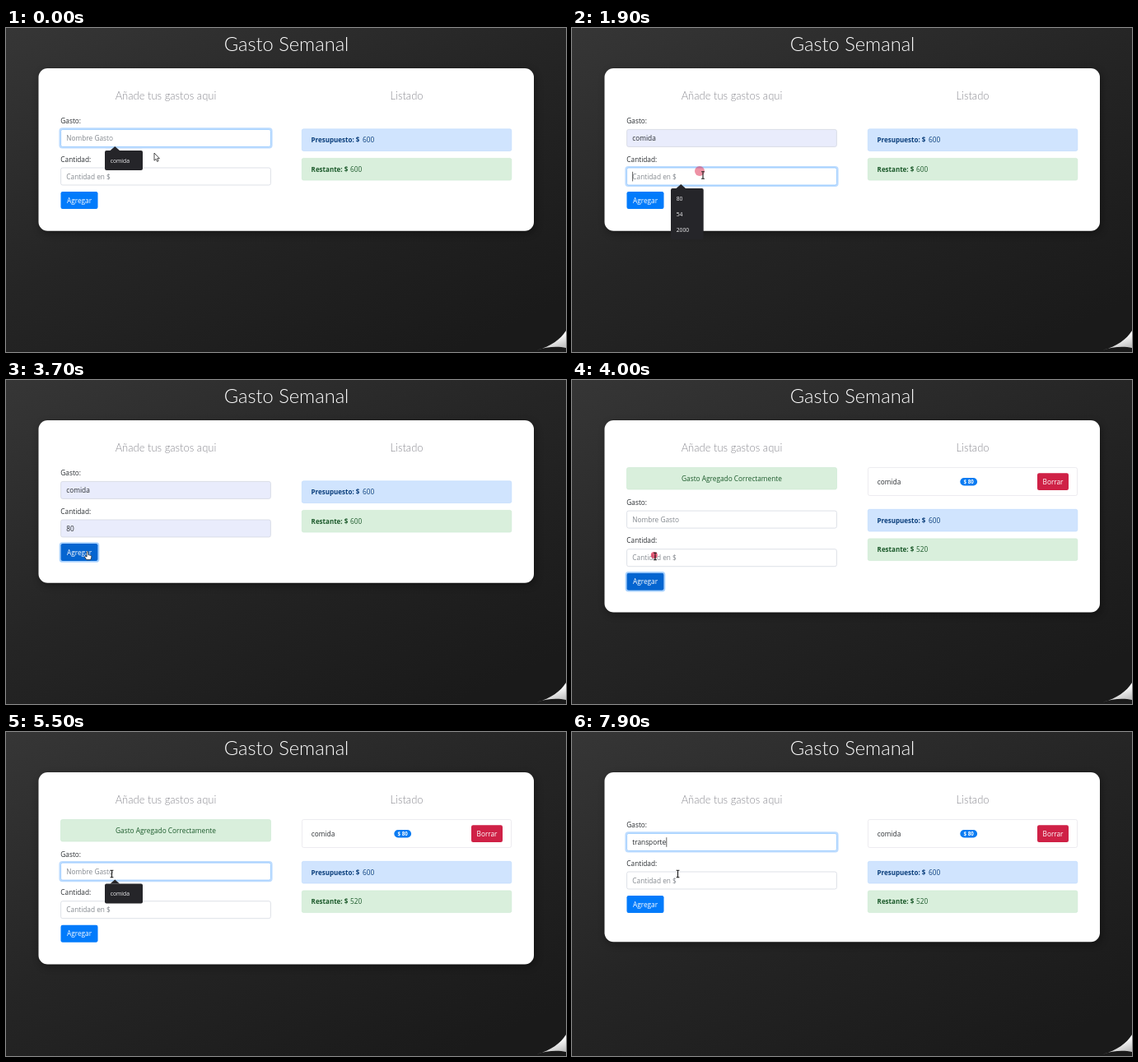
Write an HTML page that moves like this. It is 680 by 394 pixels and loops after 8 s.

```html
<!DOCTYPE html>
<html lang="es">
<head>
<meta charset="utf-8">
<title>Gasto Semanal</title>
<style>
html, body { margin: 0; width: 100%; height: 100%; overflow: hidden; background: #222; }
svg { display: block; width: 680px; height: 394px; }
text { font: 8.3px "Open Sans", "Noto Sans", sans-serif; fill: #2b2f33; white-space: pre; }
.title { font: 300 23.7px Lato, sans-serif; fill: #fff; }
.sub { font: 300 13px Lato, sans-serif; fill: #8b8b92; }
.mid { text-anchor: middle; }
.b { font-weight: 700; font-size: 8px; }
.blue text { fill: #0b3f7c; }
.green text { fill: #1c5a2b; }
.white { fill: #fff; }
.pop text { font-size: 6.8px; fill: #f1f1f3; }
.badge { font-size: 6.2px; font-weight: 700; fill: #fff; }
</style>
</head>
<body>
<svg viewBox="0 0 680 394">
  <defs>
    <linearGradient id="bg" x1="0" y1="0" x2=".8" y2="1">
      <stop offset="0" stop-color="#363636"/>
      <stop offset=".5" stop-color="#252525"/>
      <stop offset="1" stop-color="#1a1a1a"/>
    </linearGradient>
    <linearGradient id="peel" x1="0" y1="0" x2=".5" y2="1">
      <stop offset="0" stop-color="#9a9a9a"/>
      <stop offset=".5" stop-color="#fff"/>
      <stop offset="1" stop-color="#c4c4c4"/>
    </linearGradient>
    <filter id="blur" x="-10%" y="-10%" width="120%" height="120%"><feGaussianBlur stdDeviation="5"/></filter>
    <clipPath id="inCard"><rect x="39" y="0" width="602" height="247"/></clipPath>
  </defs>
  <rect width="680" height="394" fill="url(#bg)"/>
  <path d="M680 368C673 379 662 387 644 392C657 387 671 387 680 389Z" fill="url(#peel)"/>
  <text class="title mid" x="340.5" y="28">Gasto Semanal</text>

  <rect id="shade" x="41" y="52" width="602" rx="11" fill="#000" opacity=".35" filter="url(#blur)"/>
  <rect id="card" x="39.5" y="49" width="601.5" rx="11" fill="#fff"/>
  <text class="sub mid" x="194" y="87.3">Añade tus gastos aqui</text>
  <text class="sub mid" x="486.5" y="87.3">Listado</text>

  <g id="notice" class="green">
    <rect x="66.5" y="106.5" width="255" height="26.5" rx="2" fill="#d9efdc" stroke="#c9e8d0" stroke-width=".6"/>
    <text class="mid" x="194" y="123.2">Gasto Agregado Correctamente</text>
  </g>

  <g id="form">
    <text x="66.3" y="116.3">Gasto:</text>
    <g id="name"></g>
    <text x="66.3" y="162.8">Cantidad:</text>
    <g id="sum"></g>
    <rect id="addRing" x="65.6" y="198.1" width="46.8" height="22.8" rx="3" fill="none" stroke="#a9d2ff" stroke-width="1.8"/>
    <rect id="add" x="66.5" y="199" width="45" height="21" rx="2.2"/>
    <text class="mid white" x="89" y="212.6">Agregar</text>
  </g>

  <g id="item">
    <rect x="359.5" y="106.5" width="254" height="34" rx="2" fill="#fff" stroke="#e6e4ea" stroke-width=".7"/>
    <text x="370.8" y="126.8">comida</text>
    <rect x="471.3" y="119" width="20.8" height="9.4" rx="4.7" fill="#0a7bf2"/>
    <text class="badge mid" x="481.7" y="126">$ 80</text>
    <rect x="565" y="113.3" width="38" height="20.7" rx="2.2" fill="#cf2146"/>
    <text class="mid white" x="584" y="126.9">Borrar</text>
  </g>

  <g id="totals">
    <g class="blue">
      <rect x="359.3" y="122.8" width="254.5" height="26.7" rx="2" fill="#d0e4fe" stroke="#bcd9fb" stroke-width=".6"/>
      <text class="b" x="370.6" y="139.2">Presupuesto: $</text>
      <text x="433" y="139.2">600</text>
    </g>
    <g class="green">
      <rect x="359.3" y="158.4" width="254.5" height="26.7" rx="2" fill="#d9efdc" stroke="#c9e8d0" stroke-width=".6"/>
      <text class="b" x="370.6" y="174.8">Restante: $</text>
      <text id="left" x="418" y="174.8"></text>
    </g>
  </g>

  <g id="popName" class="pop"></g>
  <g id="popSum" class="pop"></g>
  <circle id="mark" fill="#dc1e46"/>
  <g id="mouse">
    <path id="arrow" d="M0 0V9.2L2.1 7.3L3.6 10.4L5.1 9.7L3.7 6.7H6.4Z" fill="#fff" stroke="#222" stroke-width=".8"/>
    <path id="beam" d="M-1.9 -4.2H-.5L0 -3.8L.5 -4.2H1.9M0 -3.8V3.8M-1.9 4.2H-.5L0 3.8L.5 4.2H1.9" fill="none" stroke="#1b1b1b" stroke-width="1.1"/>
    <path id="hand" d="M-.9 0Q0 -1 .9 0V3.6L4.3 4.5Q5 5 4.7 6.4L3.8 9.6H-1.2L-3.6 6Q-3.3 4.6 -.9 6Z" fill="#fff" stroke="#222" stroke-width=".7"/>
  </g>
</svg>
<script>
const LOOP = 8000, STEP = 100;
const $ = id => document.getElementById(id);
const set = (el, attrs) => { for (const k in attrs) el.setAttribute(k, attrs[k]); };
const show = (el, on) => el.setAttribute("display", on ? "inline" : "none");
const move = (el, x, y) => el.setAttribute("transform", `translate(${x} ${y})`);

function makeField(id, y, hint) {
  const g = $(id);
  g.innerHTML = `
    <rect x="65.4" y="${y - 1.1}" width="257.2" height="23.2" rx="3" fill="none" stroke="#bddcff" stroke-width="2"/>
    <rect x="66.6" y="${y}" width="254.8" height="21" rx="2.2" stroke-width=".7"/>
    <text x="73.3" y="${y + 13.7}"></text>
    <path stroke="#222" stroke-width=".7"/>`;
  const [ring, box, label, caret] = g.children;
  return ({ text, focus, filled, caretOn, atStart }) => {
    show(ring, focus);
    set(box, { fill: filled ? "#e9ecfc" : "#fff", stroke: focus ? "#80bdff" : "#d0d4de" });
    label.textContent = text || hint;
    label.style.fill = text ? "#2b2f33" : "#858a90";
    show(caret, caretOn);
    const x = 73.6 + (text && !atStart ? label.getComputedTextLength() + .3 : 0);
    set(caret, { d: `M${x} ${y + 4.8}v11.6` });
  };
}

function makePopup(id, y, w, h, words) {
  const g = $(id), row = 19.4;
  g.innerHTML = `
    <path d="M126.5 ${y}L132.3 ${y - 5}L138 ${y}Z" fill="#252529"/>
    <rect x="120" y="${y}" width="${w}" height="${h}" rx="2" fill="#252529"/>
    <rect x="120" y="${y + 2.3}" width="${w}" height="${row}" fill="#48484d"/>` +
    words.map((s, i) => `<text x="126.7" y="${y + 14.5 + i * row}">${s}</text>`).join("");
  return (alpha, hover, dy = 0) => {
    show(g, alpha > 0);
    set(g, { opacity: alpha });
    if (alpha < 1) set(g, { "clip-path": "url(#inCard)" });
    else g.removeAttribute("clip-path");
    show(g.children[2], hover);
    move(g, 0, dy);
  };
}

const nameField = makeField("name", 123.4, "Nombre Gasto");
const sumField = makeField("sum", 170, "Cantidad en $");
const namePopup = makePopup("popName", 149, 46, 24, ["comida"]);
const sumPopup = makePopup("popSum", 195, 39.7, 62, ["80", "54", "2000"]);

// time, x, y
const path = [
  [0, 180, 152], [100, 143, 160], [1200, 143, 160], [1700, 159, 179], [2100, 159, 179],
  [2300, 142.5, 204.5], [3100, 142.5, 204.5], [3700, 99, 209], [3800, 99, 209],
  [3900, 101, 214.5], [4000, 101, 214.5], [4700, 128.5, 172.5], [LOOP, 128.5, 172.5]
];
const clicks = [[1000, 143, 160], [1700, 155, 174], [3000, 143, 204.5], [3900, 99.8, 213], [4900, 126, 170]];
const keys = [5900, 6000, 6200, 6300, 6500, 7100, 7200, 7400, 7600, 7800];

function mouseAt(t) {
  const i = Math.max(1, path.findIndex(p => p[0] >= t));
  const [t0, x0, y0] = path[i - 1], [t1, x1, y1] = path[i];
  const u = (t - t0) / (t1 - t0), e = u * u * (3 - 2 * u);
  return [x0 + (x1 - x0) * e, y0 + (y1 - y0) * e];
}

function draw(t) {
  const added = t >= 3900, notice = added && t < 7000;
  const dy = notice ? 35.7 : 0;
  const h = notice ? 233.5 : added ? 206.3 : 197.7;
  set($("card"), { height: h });
  set($("shade"), { height: h });
  show($("notice"), notice);
  show($("item"), added);
  move($("form"), 0, dy);
  move($("totals"), 0, added ? 34.5 : 0);
  $("left").textContent = added ? "520" : "600";

  const typed = "transporte".slice(0, keys.filter(k => k <= t).length);
  const chosen = t >= 1000 && !added;
  nameField({
    text: added ? typed : chosen ? "comida" : "",
    focus: t < 1700 || t >= 4900,
    filled: chosen,
    caretOn: (t >= 1000 && t < 1700) || (t >= 4900 && t < 5500) || t >= 5900
  });
  const preview = t >= 2300 && !added;
  sumField({
    text: preview ? "80" : "",
    focus: t >= 1700 && t < 3700,
    filled: preview,
    caretOn: t >= 1700 && t < 3700 && (t < 2300 || t >= 2800),
    atStart: t < 3000
  });

  const pressed = t >= 3700 && t < 4900;
  set($("add"), { fill: pressed ? "#0565d0" : "#027bfb" });
  show($("addRing"), pressed);

  if (t < 3000) namePopup(t < 1000 ? 1 : t < 1100 ? .75 : 0, t >= 100);
  else namePopup(t >= 5000 && t < 5900 ? 1 : 0, false, 35.5);
  sumPopup(t < 1800 || t >= 3200 ? 0 : t < 3100 ? 1 : .75, t >= 2300);

  const hit = clicks.find(c => t >= c[0] && t < c[0] + 400);
  show($("mark"), !!hit);
  if (hit) {
    const age = t - hit[0];
    set($("mark"), { cx: hit[1], cy: hit[2], r: 2 + age / 50, opacity: Math.max(0, .95 - age / 430) });
  }

  const kind = t < 1500 ? "arrow" : t < 2200 ? "beam" : t < 3500 ? "arrow" : t < 3900 ? "hand" : "beam";
  for (const k of ["arrow", "beam", "hand"]) show($(k), k === kind);
  move($("mouse"), ...mouseAt(t));
}

const start = performance.now();
function tick() {
  const t = (performance.now() - start) % LOOP;
  draw(Math.floor(t / STEP) * STEP);
  requestAnimationFrame(tick);
}
tick();
</script>
</body>
</html>
```
